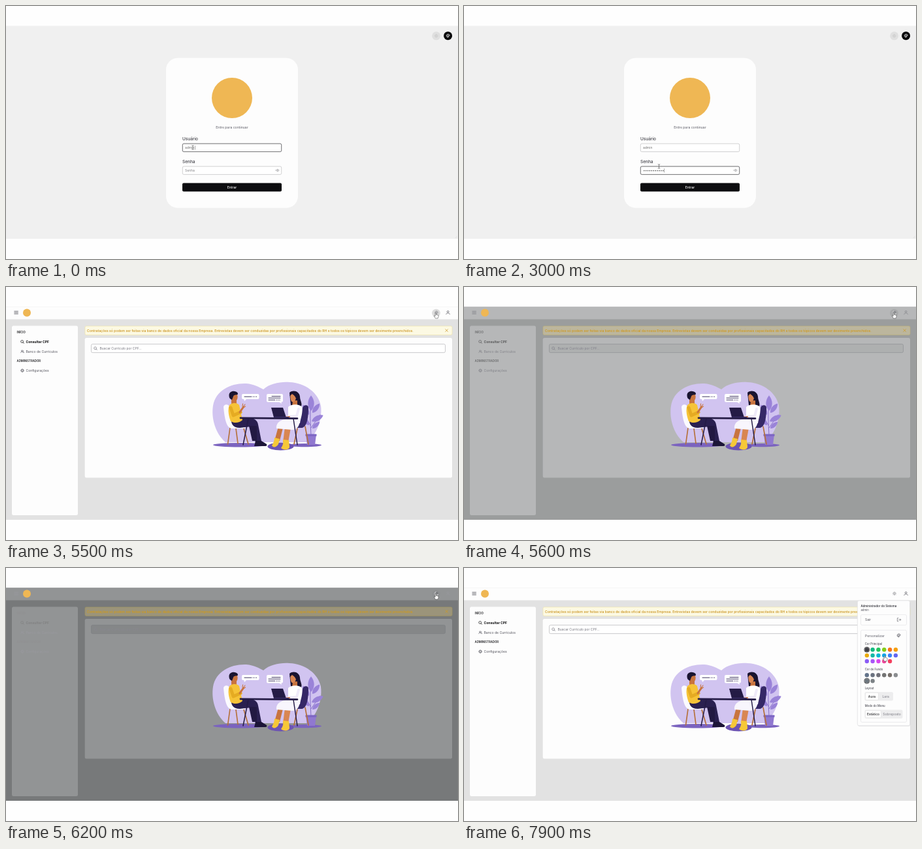
Write an HTML page that moves like this. It is 692 px wide and 388 px high and loops after 8000 ms.

```html
<!DOCTYPE html>
<html lang="pt-BR">
<head>
<meta charset="utf-8">
<title>Banco de Currículos</title>
<style>
  html, body { margin: 0; width: 100%; height: 100%; overflow: hidden; background: #fff; }
  svg { display: block; width: 692px; height: 388px; }
  text { font-family: Inter, "Open Sans", sans-serif; font-size: 5px; }
</style>
</head>
<body>
<svg id="stage" viewBox="0 0 692 388" xmlns="http://www.w3.org/2000/svg"></svg>
<script>
const LOOP = 8000;
const stage = document.getElementById('stage');

// ---------- markup helpers ----------
const text = (x, y, s, fill, size = 5, weight = 400, anchor = 'start') =>
  `<text x="${x}" y="${y}" fill="${fill}" font-weight="${weight}" text-anchor="${anchor}" style="font-size:${size}px">${s}</text>`;
const box = (x, y, w, h, r, fill, stroke = 'none', extra = '') =>
  `<rect x="${x}" y="${y}" width="${w}" height="${h}" rx="${r}" fill="${fill}" stroke="${stroke}" stroke-width=".6" ${extra}/>`;
const disc = (x, y, r, fill, extra = '') => `<circle cx="${x}" cy="${y}" r="${r}" fill="${fill}" ${extra}/>`;
const oval = (x, y, rx, ry, fill) => `<ellipse cx="${x}" cy="${y}" rx="${rx}" ry="${ry}" fill="${fill}"/>`;
const shape = (d, fill) => `<path d="${d}" fill="${fill}"/>`;
const line = (d, stroke, w = .7) =>
  `<path d="${d}" fill="none" stroke="${stroke}" stroke-width="${w}" stroke-linecap="round" stroke-linejoin="round"/>`;

// ---------- icons ----------
const sun = (x, y, c) => {
  let rays = '';
  for (let i = 0; i < 8; i++) {
    const a = i * Math.PI / 4, u = Math.cos(a), v = Math.sin(a);
    rays += `M${x + u * 2.2} ${y + v * 2.2}L${x + u * 2.6} ${y + v * 2.6}`;
  }
  return disc(x, y, 1.3, 'none', `stroke="${c}" stroke-width=".5"`) + line(rays, c, .5);
};
const moon = (x, y, c) => line(`M${x - .8} ${y - 2.6}a2.9 2.9 0 1 0 3.5 3.6a2.5 2.5 0 0 1 -3.5 -3.6z`, c);
const palette = (x, y, c, hole) =>
  `<path d="M${x + .3} ${y + 2.4}c-1.6 0 -2.6 -1.2 -2.6 -2.5c0 -1.4 1.1 -2.4 2.5 -2.4c1.4 0 2.4 .9 2.4 2c0 1.2 -2 .5 -2 1.4c0 .6 .6 1.2 -.3 1.5z"
    fill="${c}" fill-opacity=".5" stroke="${c}" stroke-width=".6" stroke-linejoin="round"/>` +
  disc(x - 1, y + .2, .5, hole) + disc(x - .3, y - 1.2, .5, hole) + disc(x + 1.1, y - 1, .5, hole);
const user = (x, y, c) =>
  disc(x, y - 1.3, 1.4, 'none', `stroke="${c}" stroke-width=".7"`) + line(`M${x - 2.8} ${y + 2.6}c0 -2.6 5.6 -2.6 5.6 0`, c);
const lens = (x, y, c) =>
  disc(x - .4, y - .4, 1.9, 'none', `stroke="${c}" stroke-width=".7"`) + line(`M${x + 1} ${y + 1}l1.4 1.4`, c);
const people = (x, y, c) =>
  disc(x - .6, y - 1, 1, 'none', `stroke="${c}" stroke-width=".6"`) +
  line(`M${x - 2.5} ${y + 1.7}c0 -2 3.8 -2 3.8 0M${x + 1} ${y - 1.8}a.9 .9 0 0 1 0 1.7M${x + 1.6} ${y + .3}q1 .3 1 1.4`, c, .6);
const gear = (x, y, c) =>
  disc(x, y, 2.2, 'none', `stroke="${c}" stroke-width=".9" stroke-dasharray="1.3 .43"`) +
  disc(x, y, 1.7, 'none', `stroke="${c}" stroke-width=".5"`) + disc(x, y, .7, c);
const eye = (x, y, c) =>
  line(`M${x - 2.5} ${y}q2.5 -3.6 5 0q-2.5 3.6 -5 0z`, c, .5) + disc(x, y, .8, 'none', `stroke="${c}" stroke-width=".5"`);

// ---------- login ----------
const field = (y, ring) =>
  box(270.3, y, 151.4, 12.4, 2, '#fff', '#b2b2b4') + box(270.3, y, 151.4, 12.4, 2, 'none', '#3a3a3d', `id="${ring}"`);
const caret = (y, id) => box(289.2, y, .5, 6.2, 0, '#555', 'none', `id="${id}"`);

const login = () => `<g id="login">
  ${box(0, 30.5, 692, 326.5, 0, '#f0f0f0')}
  ${line('M687.5 356l3 -3M689.5 356l1 -1', '#cfcfcf', .4)}
  ${disc(658.7, 45.8, 6.5, '#e0e0e0')}${sun(658.7, 45.8, '#b4b4b4')}
  ${disc(676.6, 45.7, 6.5, '#08080a')}${palette(676.6, 45.7, '#fff', '#08080a')}
  ${box(245, 79.7, 202, 230, 18, '#fdfdfd')}
  ${disc(346, 141, 31, '#efb754')}
  ${text(346, 187.8, 'Entre para continuar', '#71717a', 5.1, 500, 'middle')}
  ${text(270, 206, 'Usuário', '#3f3f46', 6.5, 500)}
  ${field(211.1, 'ringUser')}
  ${text(274, 219.2, 'admin', '#707070', 5)}
  ${caret(214.2, 'caretUser')}
  ${text(270, 240.6, 'Senha', '#3f3f46', 6.5, 500)}
  ${field(246, 'ringPass')}
  <g id="hint">${text(274, 254.2, 'Senha', '#808084', 5)}</g>
  <g id="dots">${KEYS.map((k, i) => disc(275.8 + 2.9 * i, 252.6, .8, '#444')).join('')}</g>
  ${caret(249.2, 'caretPass')}
  ${eye(415.8, 252, '#808084')}
  ${box(270, 271.4, 152, 13.2, 2, '#0c0c0f', 'none', 'id="button"')}
  <g id="label">${text(346, 280, 'Entrar', '#fff', 5, 500, 'middle')}</g>
  <g id="spinner">${line('M2.3 0A2.3 2.3 0 1 1 0 -2.3', '#fff', .5)}</g>
</g>`;

// ---------- dashboard ----------
const scene = () => {
  const ink = '#2a2050', skin = '#c8743f', leaf = '#9a83d8', wood = '#b5713c';
  const leafAt = (x, y, a, s) =>
    `<path transform="translate(${x} ${y}) rotate(${a}) scale(${s})" d="M0 0C-5 -5 -5 -13 0 -19C5 -13 5 -5 0 0z" fill="${leaf}"/>`;
  return `<g id="scene">
  ${shape('M336 238C320 224 314 200 317 182C321 158 345 147 368 148C380 149 388 154 394 157C404 148 420 145 434 146C458 147 478 162 482 182C485 205 474 228 461 238z', '#d1c4f0')}
  ${oval(358, 242.2, 41, 3.2, '#7b63bf')}${oval(457, 242.6, 26, 2.6, '#7b63bf')}${oval(420.5, 244.6, 20, 6, '#6d54b3')}
  ${line('M467 228C466 208 465 195 467 178M467 216L481 196M466 212L457 196', '#7d66c4', .9)}
  ${leafAt(467, 190, 0, 1.25)}${leafAt(469, 193, 38, .95)}${leafAt(464, 196, -32, .95)}
  ${leafAt(468, 206, 62, 1.05)}${leafAt(464, 212, -40, .8)}${leafAt(469, 217, 48, .8)}
  ${shape('M459 226h16l-2 16h-12z', '#9078d0')}${box(458.5, 225.5, 17, 3.2, .8, '#7d66c4')}
  ${line('M343 216L339.5 241M352 217L355 240M364 217L371 241', wood, 1.7)}
  ${shape('M333 184C334 179 341 179 343 185L348 206H365C369 207 369 216 364 217H346C338 216 335 205 333 184z', '#fbfaff')}
  ${shape('M345 202L365 201C378 200 385 203 386 211L391 236L382 238L375 214L358 216C348 216 344 210 345 202z', ink)}
  ${shape('M372 213L377 236L384 236L384 213z', '#221942')}
  ${shape('M382 236H391L399 241C400 243 399 244 397 244H380z', '#1c1538')}
  ${shape('M345 172H353V180H345z', skin)}
  ${shape('M342 181C346 177 354 177 357 181L362 204C357 209 349 209 344 206C341 198 339 188 342 181z', '#f6c338')}
  ${shape('M344 162C350 159 355 163 354.6 169C354.4 174 351 176 348 174C344 172 342 167 344 162z', skin)}
  ${shape('M341.5 167C341 161 347 158.5 352 160.5C355 161.5 355.5 164 354.5 165C351 165.5 348.5 165 347.5 169L346 173C343 172 341.5 170 341.5 167z', '#1a1430')}
  ${line('M344 185L348 197L359 192', '#e5ab22', 5)}
  ${line('M358 192L363.5 184', skin, 3)}${line('M363 184L366 180M363.5 185L366.6 183M362 183L362.6 179', skin, 1.1)}
  ${line('M458 214L463 241M446 217L441 241', wood, 1.7)}
  ${shape('M463 185C463 180 455 180 454 186L450 206H436V216H453C460 215 463 203 463 185z', '#352866')}
  ${shape('M417 214L424 216L419 236L411 236z', skin)}${shape('M427 215L436 216L432 238L424 238z', '#d98652')}
  ${shape('M411 231L419 233L417 241C414 246 409 247 407 243C409 240 411 236 411 231z', '#f6c838')}
  ${shape('M424 234L433 235L434 245C434 250 425 251 421 247C424 243 425 239 424 234z', '#f6c838')}
  ${shape('M434 162C440 157 449 160 450 168C450 175 455 179 451 185C447 189 438 186 436 181z', '#1a1430')}
  ${shape('M439 174H446V184H438z', skin)}
  ${shape('M432 184C437 179 449 179 453 184C455 193 451 201 450 209L432 210z', '#fff')}
  ${shape('M450 203C450 212 446 219 438 219L414 217C413 210 418 204 428 203z', '#f8f6fd')}
  ${shape('M435.5 166C436 161 444 161 444.5 167C444.6 173 441 177 438 176C436 175 435 170 435.5 166z', '#d98652')}
  ${shape('M434.6 167C434 160 444 157 448 164C449 169 446 173 444.5 174C444 168 441 166 438 164z', '#1a1430')}
  ${line('M448 187L445 198L432 199', '#efeaf9', 4)}${line('M434 199L426 200', skin, 2)}
  ${shape('M406 185H424L429 200H410z', '#241b45')}${shape('M410 199H433V201H411z', '#3b2f6b')}
  ${line('M371 202L363 242M440 202L446 242', '#241b45', 1.5)}
  ${line('M359 200.8L446 201.6', '#241b45', 2.8)}
  ${box(361, 164, 26.5, 8, 2, '#fff')}${shape('M364 171h5l-4 4z', '#fff')}
  ${line('M365 168.2H376', ink, .9)}${[378.5, 381, 383.5].map(x => disc(x, 168.2, .6, ink)).join('')}
  ${box(399, 164, 25, 12.5, 2, '#fff')}${shape('M416 175h5l1 4z', '#fff')}
  ${line('M407 167.6H420M402 170.2H420M402 173.2H412', ink, .9)}${[414.5, 416.8, 419].map(x => disc(x, 173.2, .6, ink)).join('')}
  </g>`;
};

const LIGHT = { id: 'light', bg: '#e2e2e2', panel: '#fdfdfd', field: '#fff', edge: '#a8a8ac', title: '#27272a', item: '#52525b',
  active: '#09090b', hint: '#71717a', warnBg: '#fcf9e3', warnEdge: '#f1e6a5', warn: '#c88f16', hover: '#dcdcdc', icon: sun };
const DARK = { id: 'dark', bg: '#090e10', panel: '#24282a', field: '#080c0e', edge: '#4b5155', title: '#fff', item: '#e4e4e7',
  active: '#fff', hint: '#a1a1aa', warnBg: '#382c0e', warnEdge: '#57430f', warn: '#e6a90f', hover: '#3c4144', icon: moon };

const dashboard = c => `<g id="${c.id}">
  ${box(0, 30.5, 692, 326.5, 0, c.bg)}
  ${box(0, 30.5, 692, 19, 0, c.panel)}
  ${line('M12.8 37.2h5.6M12.8 39.2h5.6M12.8 41.2h5.6', c.item, .8)}
  ${disc(32, 39.6, 6, '#efb754')}
  <g class="hover">${disc(658.5, 40, 6.3, c.hover)}</g>
  ${c.icon(659, 39.2, c.item)}${user(676.6, 39.2, c.item)}
  ${box(9, 59.5, 101, 290.5, 2.5, c.panel)}
  ${text(16.5, 70.8, 'INÍCIO', c.title, 4.3, 600)}
  ${lens(25, 84, c.active)}${text(30.5, 85.9, 'Consultar CPF', c.active, 5.05, 700)}
  ${people(25, 99, c.item)}${text(30.5, 101, 'Banco de Currículos', c.item, 5.05)}
  ${text(16.5, 115.2, 'ADMINISTRADOR', c.title, 4.3, 600)}
  ${gear(25, 128.1, c.item)}${text(30.5, 130, 'Configurações', c.item, 5.05)}
  ${box(121, 60, 562, 13.5, 2, c.warnBg, c.warnEdge)}
  ${text(124, 68.7, 'Contratações só podem ser feitas via banco de dados oficial da nossa Empresa. Entrevistas devem ser conduzidas por profissionais capacitados do RH e todos os tópicos devem ser devimente preenchidos.', c.warn, 5.08, 500)}
  ${line('M672.8 64.8l3.6 3.6M676.4 64.8l-3.6 3.6', c.warn, .7)}
  ${box(120.7, 78, 562.3, 214.5, 2.5, c.panel)}
  ${box(130.5, 87.6, 542, 13, 2, c.field, c.edge)}
  ${lens(137, 94.2, c.hint)}${text(143.5, 96, 'Buscar Currículo por CPF...', c.hint)}
  <use href="#scene"/>
</g>`;

// ---------- profile menu ----------
const swatches = (colors, y) => colors.split(' ').map((c, i) =>
  disc(616.8 + 8.82 * (i % 6), y + 8.9 * Math.floor(i / 6), 3.2, '#' + c)).join('');
const picked = y => disc(616.8, y, 4, 'none', 'stroke="#18181b" stroke-width=".8"');
const toggle = (y, w, split, on, off) =>
  box(613.5, y, w, 13.2, 2, '#ededee') + box(614.5, y + 1, split - 1, 11.2, 1.6, '#fff', '#ddd') +
  text(613.5 + (split + 1) / 2, y + 8.4, on, '#27272a', 5, 500, 'middle') +
  text(613.5 + (split + w) / 2, y + 8.4, off, '#8a8a92', 5, 500, 'middle');

const menu = () => `<g id="menu">
  ${box(602.8, 51, 80.6, 192, 3, '#000', 'none', 'opacity=".07"')}
  ${box(602.3, 50, 80.4, 191.8, 2.5, '#fdfdfd', '#d9d9dc')}
  ${text(607.4, 59.8, 'Administrador do Sistema', '#3f3f46', 4.4, 600)}
  ${text(607.4, 66.3, 'admin', '#52525b', 4.3)}
  ${box(607.5, 71.6, 70, 16, 2, '#fdfdfd', '#e0e0e3')}
  ${text(614, 81.3, 'Sair', '#52525b')}
  ${line('M665 76.8h-1.6v5h1.6M665.6 79.3h3M667.6 78l1.2 1.3l-1.2 1.3', '#52525b', .6)}
  ${box(607.5, 95.3, 70, 141.2, 2, '#fdfdfd', '#e0e0e3')}
  ${text(614, 105.7, 'Personalizar', '#71717a', 5, 500)}${palette(665.5, 103.5, '#52525b', '#fdfdfd')}
  ${text(613.7, 117.7, 'Cor Principal', '#52525b', 4.3, 500)}
  ${swatches('3f3f46 10b981 22c55e 84cc16 f97316 f59e0b eaab08 14b8a6 06b6d4 0ea5e9 3b82f6 6366f1 8b5cf6 a855f7 d946ef ec4899 f43f5e', 125.2)}${picked(125.2)}
  ${text(613.7, 157.1, 'Cor de Fundo', '#52525b', 4.3, 500)}
  ${swatches('64748b 6b7280 71717a 737373 78716c 8a8d90 6c757d 7c8286', 164.3)}${picked(173.2)}
  ${text(613.7, 186, 'Layout', '#52525b', 4.3, 500)}
  ${toggle(190.3, 43.5, 21, 'Aura', 'Lara')}
  ${text(613.7, 213.3, 'Modo do Menu', '#52525b', 4.3, 500)}
  ${toggle(217.6, 58, 25, 'Estático', 'Sobreposto')}
</g>`;

// ---------- pointer ----------
const outline = 'fill="#fff" stroke="#333" stroke-width=".5" stroke-linejoin="round"';
const pointer = () => `<g id="pointer">
  <g id="beam">${line('M-1.3 -3.3Q0 -3.3 0 -2.5V2.5Q0 3.3 -1.3 3.3M1.3 -3.3Q0 -3.3 0 -2.5M0 2.5Q0 3.3 1.3 3.3', '#444', .6)}</g>
  <g id="arrow"><path d="M0 0V5.8L1.3 4.6L2.2 6.6L3.1 6.2L2.2 4.3H4z" ${outline}/></g>
  <g id="hand"><path d="M-.7 .6C-.7 -.3 .7 -.3 .7 .6V3C1.3 2.6 1.9 2.8 2 3.3C2.6 3 3.1 3.2 3.2 3.7C3.9 3.5 4.3 3.9 4.3 4.6C4.3 6.6 3.6 7 3.4 8.5H-.4C-.7 7.2 -2 6.3 -2.4 5C-2.5 4.2 -1.6 4.1 -.7 5.2z" ${outline}/></g>
</g>`;

// ---------- timeline (ms) ----------
const KEYS = [1300, 1400, 1500, 1700, 1800, 2100, 2200, 2600, 2800, 2900, 3000, 3100];
const PATH = [[0, 286, 217], [650, 286, 217], [1000, 298.5, 246], [3350, 298.5, 246], [3700, 318, 277], [3880, 318, 277],
  [4100, 327.6, 284.6], [4600, 327.6, 284.6], [5420, 657.8, 39.6], [6350, 657.8, 39.6], [6800, 676.6, 38.4],
  [7050, 676.6, 38.4], [7700, 649, 137], [7800, 649, 137], [7900, 643.8, 134.4], [8000, 643.8, 134.4]];
const KINDS = [[0, 'beam'], [3480, 'arrow'], [3600, 'hand'], [4030, 'arrow'], [5380, 'hand'], [6500, 'arrow'],
  [6680, 'hand'], [7150, 'arrow'], [7400, 'hand']];
const SUBMIT = 3800, ENTER = 4600;

stage.innerHTML = `<defs>${scene()}</defs>` + box(0, 0, 692, 388, 0, '#fefefe') +
  login() + `<g id="home">${dashboard(LIGHT)}${dashboard(DARK)}${menu()}</g>` + pointer();

const el = {};
stage.querySelectorAll('[id]').forEach(n => el[n.id] = n);
const hovers = stage.querySelectorAll('.hover');
const dots = [...el.dots.children];

const show = (n, on) => n.setAttribute('display', on ? 'inline' : 'none');
const fade = (n, v) => n.setAttribute('opacity', v);
const ramp = (t, a, b) => Math.min(1, Math.max(0, (t - a) / (b - a)));
const ease = p => p * p * (3 - 2 * p);

function render(t) {
  const inside = t >= ENTER;
  show(el.login, !inside);
  show(el.home, inside);

  const focus = ramp(t, 900, 1100), typed = KEYS.filter(k => t >= k).length, loading = t >= SUBMIT;
  fade(el.ringUser, 1 - focus);
  fade(el.ringPass, focus * (1 - ramp(t, SUBMIT - 50, SUBMIT + 150)));
  show(el.caretUser, t < 100);
  show(el.caretPass, t >= 1000 && t < SUBMIT - 50);
  el.caretPass.setAttribute('x', 274.2 + 2.9 * typed);
  show(el.hint, !typed);
  dots.forEach((d, i) => show(d, i < typed));
  fade(el.button, 1 - .4 * ramp(t, SUBMIT, SUBMIT + 200));
  el.label.setAttribute('transform', `translate(${loading ? 3.6 : 0} 0)`);
  show(el.spinner, loading);
  el.spinner.setAttribute('transform', `translate(337.3 278.2) rotate(${(t - SUBMIT) * .36 % 360})`);

  fade(el.dark, ease(ramp(t, 5510, 5750)) * (1 - ease(ramp(t, 6110, 6290))));
  hovers.forEach(h => fade(h, ramp(t, 5350, 5450) * (1 - ramp(t, 6150, 6300))));

  const open = ease(ramp(t, 6950, 7080));
  fade(el.menu, open);
  el.menu.setAttribute('transform', `translate(0 ${10 * (1 - open)}) scale(1 ${.8 + .2 * open})`);

  const i = Math.max(1, PATH.findIndex(p => t < p[0]));
  const [t0, x0, y0] = PATH[i - 1], [t1, x1, y1] = PATH[i];
  const p = ease(ramp(t, t0, t1));
  el.pointer.setAttribute('transform', `translate(${x0 + (x1 - x0) * p} ${y0 + (y1 - y0) * p})`);
  const kind = KINDS.filter(k => t >= k[0]).pop()[1];
  for (const k of ['beam', 'arrow', 'hand']) show(el[k], k === kind);
}

function tick() {
  render(performance.now() % LOOP);
  requestAnimationFrame(tick);
}
tick();
</script>
</body>
</html>
```
